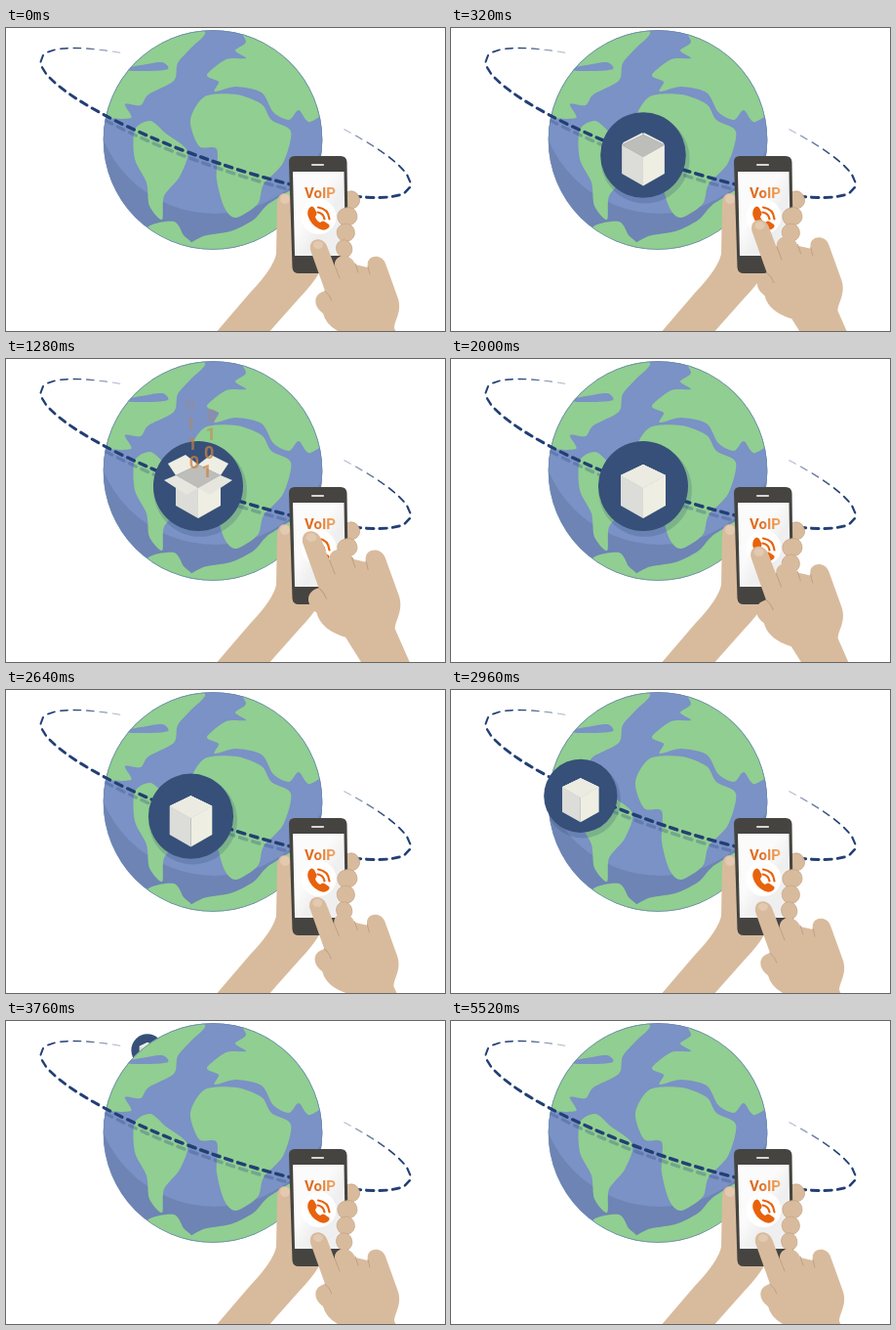
An HTML page for the animation above (5.76 s loop, 450x310 px).

```html
<!DOCTYPE html>
<html lang="en">
<head>
<meta charset="utf-8">
<title>VoIP around the globe</title>
<style>
html, body { margin: 0; width: 100%; height: 100%; overflow: hidden; background: #fff; }
svg { display: block; width: 450px; height: 310px; }
.skin { fill: #d8bb9d; }
.crease { fill: none; stroke: #c1a081; stroke-width: 1; stroke-linecap: round; }
.nail { fill: #e2c9af; }
.call { fill: none; stroke: #e8620c; stroke-linecap: round; }
.label { font: bold 15px Roboto, Arial, sans-serif; }
.digit { font: bold 18px Roboto, Arial, sans-serif; fill: #c98240; text-anchor: middle; }
</style>
</head>
<body>
<svg viewBox="0 0 450 310">
  <defs>
    <clipPath id="disc"><circle cx="212" cy="114.5" r="112.3"/></clipPath>
    <linearGradient id="ink"><stop offset=".3" stop-color="#e06c1f"/><stop offset="1" stop-color="#f0ab68"/></linearGradient>
    <linearGradient id="glass" x2="1" y2="1"><stop offset=".4" stop-color="#fbfbfc"/><stop offset=".6" stop-color="#efeff0"/></linearGradient>
  </defs>

  <g id="globe" clip-path="url(#disc)">
    <rect x="99" width="226" height="230" fill="#6d84b5"/>
    <circle cx="214" cy="66" r="124" fill="#7a92c5"/>
    <g id="land"></g>
    <circle cx="212" cy="114.5" r="112" fill="none" stroke="#6f8bb0" stroke-width="1"/>
    <g id="orbitShade" stroke="#2c4a82" stroke-opacity=".3" transform="translate(2 6)"></g>
    <circle id="badgeShade" fill="#27406f" fill-opacity=".2"/>
  </g>
  <g id="orbit" stroke="#223f74"></g>

  <g id="badge">
    <circle r="46" fill="#365079"/>
    <g id="backFlaps"></g>
    <g id="digits"></g>
    <g id="boxBody"></g>
    <g id="frontFlaps"></g>
  </g>

  <g id="leftHand">
    <g id="farFinger"></g>
    <path class="skin" d="M214 313L250 271Q274 246 277 231L278 178Q279 169 286 169Q294 170 294 180V236L322 248Q318 258 300 277L268 313Z"/>
    <ellipse class="nail" cx="286" cy="175" rx="5" ry="5"/>
    <path fill="#454440" d="M296 131H343Q349 131 349.500 137L351 245Q351 251 345 251H300Q294 251 293.500 245L290 137Q290 131 296 131Z"/>
    <path fill="url(#glass)" d="M294 147H346.500L348 233H296Z"/>
    <path stroke="#d8d6d4" stroke-width="2.200" stroke-linecap="round" d="M314 140H325"/>
    <text class="label" x="306" y="173.500" fill="url(#ink)">VoIP</text>
    <circle cx="320.500" cy="193" r="18" fill="#fff"/>
    <path fill="#e8620c" d="M311 184Q313.500 181 316 184L318.500 189Q319 191 317 193Q318 197 322 199Q324.500 196.500 326.500 198L331 201Q332.500 203 330 205Q326 208 321 205.500Q312 201 309.500 192Q308.500 187 311 184Z"/>
    <path class="call" stroke-width="2.200" d="M319.500 188.500Q325.500 189.500 326.500 195.500M320 183.500Q330.500 185 331.500 195.500"/>
    <g id="nearFingers"></g>
  </g>

  <g id="hand">
    <path class="skin" d="M312 227C310 214 325 213 329 223L337 244C335 231 354 229 358 242L371 245C368 232 385 230 389 241L402 277C406 291 398 299 398 307L417 350H374L352 315Q329 308 325 292C314 284 315 272 327 269Z"/>
    <ellipse class="nail" cx="320" cy="222" rx="5" ry="4"/>
    <path class="crease" d="M337 243L342 256M358 241L361 250M371 244L373 252M327 269Q332 273 334 279"/>
  </g>
</svg>

<script>
const LOOP = 5760, STEP = 80;
const $ = id => document.getElementById(id);
const clamp = x => Math.max(0, Math.min(1, x));
const mix = (a, b, k) => a + (b - a) * k;
const smooth = x => { x = clamp(x); return x * x * (3 - 2 * x); };

function set(node, attrs) {
  for (const name in attrs) node.setAttribute(name, attrs[name]);
}
function add(parent, tag, attrs) {
  const node = document.createElementNS('http://www.w3.org/2000/svg', tag);
  set(node, attrs);
  return parent.appendChild(node);
}

// Closed Catmull-Rom outline through a few key points.
function outline(text) {
  const p = text.split(' ').map(s => s.split(',').map(Number)), n = p.length;
  const handle = (a, b, c) => [0, 1].map(i => b[i] + (c[i] - a[i]) / 7);
  return p.reduce((d, a, i) => {
    const b = p[(i + 1) % n];
    return d + 'C' + [handle(p[(i + n - 1) % n], a, b), handle(p[(i + 2) % n], b, a), b].join(' ');
  }, 'M' + p[0]) + 'Z';
}
const region = (fill, points) => add($('land'), 'path', { fill, d: outline(points) });

const GREEN = '#91ce91', SEA = '#7a92c5';
const northAmerica = '98,88 112,50 140,8 175,-4 204,4 190,20 176,36 172,54 146,68 138,79 122,78 128,92';
const hudsonBay = '116,43 138,38 160,35 166,42 146,44';
const southAmerica = '132,104 148,95 164,108 186,126 178,152 162,172 160,196 147,182 144,158 132,134';
const eurasia = '240,-5 246,14 235,23 246,31 226,32 206,48 218,55 214,65 236,60 262,66 274,86 290,94 300,84 312,96 335,70 300,0';
const africa = '189,94 204,70 236,68 262,78 272,94 292,106 284,138 264,160 258,180 236,194 224,184 216,155 216,124 198,121';
const antarctica = '185,232 200,214 230,208 254,196 272,178 316,160 330,230';
const cape = '145,205 172,198 182,212 190,222 165,235';
[northAmerica, southAmerica, eurasia, africa, antarctica, cape].forEach(points => region(GREEN, points));
region(SEA, hudsonBay);

// Tilted orbit; 90 degrees is nearest to the viewer.
function orbitPoint(deg) {
  const a = deg * Math.PI / 180;
  return [225 + 189.5 * Math.cos(a), 97 + 76.5 * (.82 * Math.cos(a) + .572 * Math.sin(a))];
}
function drawOrbit(from, to) {
  let start = orbitPoint(from), last = start, run = 0, inked = true;
  for (let deg = from; deg <= to; deg += .1) {
    const p = orbitPoint(deg), depth = Math.sin(deg * Math.PI / 180);
    run += Math.hypot(p[0] - last[0], p[1] - last[1]);
    last = p;
    if (run < (inked ? 7.3 : 5.9)) continue;
    if (inked) {
      const fade = clamp(.25 + Math.min(deg - from, to - deg) / 30);
      const dash = { d: `M${start}L${p}`, 'stroke-width': 2.2 + 1.3 * depth, 'stroke-linecap': 'round', opacity: fade };
      add($('orbit'), 'path', dash);
      if (depth > .3) add($('orbitShade'), 'path', dash);
    }
    start = p;
    run = 0;
    inked = !inked;
  }
}
drawOrbit(-50, 239);

for (let i = 0; i < 4; i++) {
  const width = 22 - 2 * i;
  add($(i ? 'nearFingers' : 'farFinger'), 'rect', {
    class: 'skin', x: -width / 2, y: -9, width, height: 18, rx: 8.5, stroke: '#c5a485', 'stroke-width': .7,
    transform: `translate(${351.5 - 1.6 * i} ${176.5 + 16.4 * i}) rotate(-15)`
  });
}

// Parcel corners relative to the badge centre; the right side mirrors the left.
const flip = ([x, y]) => [-x, y];
const down = ([x, y]) => [x, y + 31];
const mid = (a, b) => [(a[0] + b[0]) / 2, (a[1] + b[1]) / 2];
const left = [-23, -11], right = flip(left), back = [0, -22], front = [0, 2];
const polygon = (parent, fill, points = []) => add(parent, 'polygon', { fill, points: points.join(' ') });

polygon($('backFlaps'), '#bdbdba', [left, back, right, front]);
polygon($('boxBody'), '#dcdcd8', [left, front, down(front), down(left)]);
polygon($('boxBody'), '#efeee2', [front, right, down(right), down(front)]);

const flaps = [];
function addFlapPair(layer, fill, hinge, opposite, outer, side) {
  for (const m of [p => p, flip]) {
    flaps.push({
      node: polygon($(layer), fill),
      hinge: [m(left), hinge],
      open: [m(outer), m(side)],
      shut: [mid(hinge, m(right)), mid(m(left), opposite)]
    });
  }
}
addFlapPair('backFlaps', '#efeee4', back, front, [-13, -32], [-31, -23]);
addFlapPair('frontFlaps', '#e6e6de', front, back, [-12, 9], [-35, -6]);
const lid = polygon($('frontFlaps'), '#ebebe2', [left, back, right, front]);

const digits = Array.from({ length: 18 }, (_, i) => {
  const node = add($('digits'), 'text', { class: 'digit', x: 3 + 11 * Math.sin(4 + 3 * i) });
  node.textContent = '10011'[i % 5];
  return { node, start: 345 + 50 * i };
});

function drawHand(t) {
  const lift = smooth(t / 640) * (1 - smooth((t - 1280) / 1700));
  set($('hand'), {
    transform: `translate(${321 - 7 * lift} ${217 - 40 * lift}) scale(${1 + .1 * lift * lift}) translate(-321 -217)`
  });
}

function drawParcel(t) {
  const openness = smooth((t - 160) / 320) * (1 - smooth((t - 1360) / 560));
  for (const { node, hinge, open, shut } of flaps) {
    const rim = shut.map((p, i) => p.map((v, axis) => mix(v, open[i][axis], openness)));
    set(node, { points: [...hinge, ...rim].join(' ') });
  }
  set(lid, { visibility: openness < .02 ? 'visible' : 'hidden' });

  for (const { node, start } of digits) {
    const k = (t - start) / 480;
    set(node, { y: mix(-92, 0, k), opacity: k > 0 && k < 1 ? .75 * Math.min(1, 1.5 * k) : 0 });
  }
}

function drawBadge(t) {
  const k = clamp((t - 2480) / 1280), angle = 98.5 + 146.5 * k * k;
  const [x, orbitY] = orbitPoint(angle);
  const y = orbitY - 1 + 5 * Math.sin(Math.PI * k);
  const grow = 1 - (1 - clamp((t - 40) / 440)) ** 3;
  const visible = t >= 80 && t < 3840;
  const radius = visible ? (46 - 18 * k - 11.5 * k * k) * grow : 0;
  set($('badge'), { transform: `translate(${x} ${y}) scale(${radius / 46})` });

  const behind = angle > 172;
  set($('badgeShade'), { cx: x + 2, cy: y + 4, r: behind ? 0 : radius * 1.04 });
  const next = behind ? $('globe') : $('leftHand');
  if ($('badge').nextElementSibling !== next) next.before($('badge'));
}

function frame(now) {
  const t = Math.floor(now % LOOP / STEP) * STEP;
  drawHand(t);
  drawParcel(t);
  drawBadge(t);
  requestAnimationFrame(frame);
}
frame(0);
</script>
</body>
</html>
```
